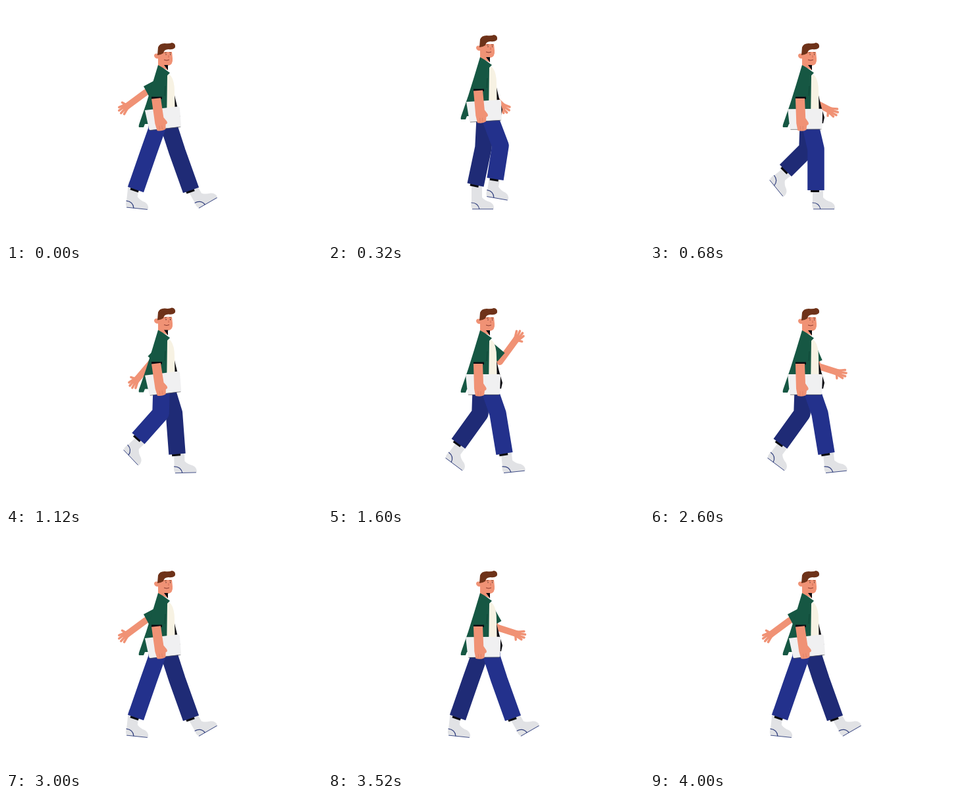
These frames come from a looping animation (480x360 px, 4040 ms). An HTML page with a canvas:

```html
<!DOCTYPE html>
<html>
<head>
<meta charset="utf-8">
<title>Walking and waving</title>
<style>
  html, body { margin: 0; width: 100%; height: 100%; overflow: hidden; background: #fff; }
  canvas { display: block; width: 480px; height: 360px; }
</style>
</head>
<body>
<canvas id="stage" width="480" height="360"></canvas>
<script>
const ctx = document.getElementById('stage').getContext('2d');
const SKIN = '#f09275', HAIR = '#6e3219', GREEN = '#165743', BLACK = '#0b0b10',
      CREAM = '#f7f2e3', LAPTOP = '#f0f0f1', BOOT = '#e1e2e5', SOLE = '#34427f',
      NEAR = '#23318c', FAR = '#1f2b76';
const TAU = Math.PI * 2;

// Every two steps of a 24 step stride, starting with the heel strike:
// hip x, knee x y, cuff x y, sole x y, foot angle
const LEG = [
  [249, 260, 222, 281, 281, 299, 305, -30],
  [248, 258, 219, 268, 280, 274, 309, -6],
  [245, 252, 218, 252, 281, 255, 310, 0],
  [242, 244, 218, 239, 277, 240, 310, 0],
  [238, 236, 216, 224, 273, 226, 310, 0],
  [233, 225, 218, 210, 275, 208, 310, 0],
  [229, 217, 222, 197, 280, 190, 308, 6],
  [232, 231, 219, 198, 265, 184, 291, 37],
  [240, 239, 218, 206, 251, 186, 271, 51],
  [245, 253, 215, 224, 252, 208, 276, 40],
  [248, 262, 213, 254, 264, 248, 292, 10],
  [249, 263, 215, 279, 272, 289, 300, -20]
];

// Every four steps: sleeve end, elbow, hand
const SWING = [
  [213, 130, 212, 132, 181, 155],
  [226, 138, 224, 144, 206, 172],
  [246, 141, 248, 148, 266, 166],
  [256, 137, 255, 142, 289, 153],
  [248, 141, 252, 148, 275, 160],
  [228, 139, 226, 145, 208, 171]
];

const BOB = [[0], [2], [0], [-7], [-12], [-8]];

// Smooth closed curve through evenly spaced keys
function curve(keys, u) {
  const n = keys.length, i = Math.floor(u), f = u - i;
  const [a, b, c, d] = [-1, 0, 1, 2].map(o => keys[(i + o + n) % n]);
  return b.map((v, j) => v + f / 2 * (c[j] - a[j]
    + f * (2 * a[j] - 5 * v + 4 * c[j] - d[j]
    + f * (3 * (v - c[j]) + d[j] - a[j]))));
}

function ramp(t, from, to) {
  const u = Math.min(1, Math.max(0, (t - from) / (to - from)));
  return u * u * (3 - 2 * u);
}

function fill(path, color) {
  ctx.fillStyle = color;
  ctx.fill(new Path2D(path));
}

function stroke(path, color, width, cap = 'butt') {
  ctx.strokeStyle = color;
  ctx.lineWidth = width;
  ctx.lineCap = cap;
  ctx.lineJoin = 'round';
  ctx.stroke(new Path2D(path));
}

function at(x, y, angle, draw) {
  ctx.save();
  ctx.translate(x, y);
  ctx.rotate(angle);
  draw();
  ctx.restore();
}

function foot() {
  fill('M-8 -40H8V-18Q12 -13 20 -11Q26 -8 26 -2L25 0H-6Q-10 -3 -8 -11Z', BOOT);
  stroke('M-8.5 -10Q2 -10 4 0', SOLE, 1.2);
  stroke('M-7 -.2H25', SOLE, .9);
}

function leg(step, bob, color) {
  const [hip, kx, ky, cx, cy, fx, fy, a] = curve(LEG, step % 24 / 2);
  at(fx, fy, a * TAU / 360, foot);
  at(cx, cy, Math.atan2(cy - ky, cx - kx), () => fill('M-2 -5H3V8H-2Z', BLACK));
  stroke(`M${hip} ${180 + bob}V${188 + bob}L${kx} ${ky}L${cx} ${cy}`, color, 25.5);
}

function hand() {
  fill('M-8 -4L2 -6Q6 0 2 6L-8 4Z', SKIN);
  for (const [y, tx, ty] of [[-4, 7, -7], [-1, 10, -3], [2, 10, 2], [4, 7, 6]])
    stroke(`M0 ${y}L${tx} ${ty}`, SKIN, 3.6, 'round');
  stroke('M-4 2L-1 9', SKIN, 3.4, 'round');
}

function farArm(t, step) {
  const wag = Math.cos((t - 1600) / 373 * TAU);
  const wave = [263, 131, 261, 138, 291.5 - 3.5 * wag, 103.5 - 2.5 * wag];
  const w = ramp(t, 1280, 1580) * (1 - ramp(t, 2300, 2600));
  const [sx, sy, ex, ey, hx, hy] =
    curve(SWING, step / 4).map((v, i) => v + (wave[i] - v) * w);
  stroke(`M243 114L${ex} ${ey}L${hx} ${hy}`, SKIN, 10);
  at(hx, hy, Math.atan2(hy - ey, hx - ex), hand);
  stroke(`M243 114L${sx} ${sy}`, GREEN, 17);
}

function head() {
  fill('M231 70H252L253 80Q254 90 246 91V98L231 91Z', SKIN);
  fill('M232 73Q225 71 225 76Q226 81 232 80Z', SKIN);
  fill('M230 75L231 63Q233 57 241 57Q248 58 252 56Q258 57 257 63Q254 67 247 66Q240 66 239 72L235 74Z', HAIR);
  fill('M240 90H246V98Z', BLACK);
  stroke('M241 71.5L244 71M248 71L251 71.5', HAIR, .8);
  stroke('M242.5 74H243.6M249 74H250.1', BLACK, 1.2);
  stroke('M246.5 75L247.5 78H246', '#c9654e', .7);
  stroke('M240 82Q244 84 248 82', '#7c2f26', .9);
}

function torso() {
  fill('M254 128L260 153L265 170L263 179H254Z', BLACK);
  fill('M243 103L250 106Q256 114 256 130L257 178H242Z', CREAM);
  fill('M231 90L238 94L249 102L245 106L244 180H211L209 185H202Q201 183 203 178L213 149L222 120Z', GREEN);
  stroke('M242 122L241 137', '#0f4535', .9);
  fill('M221 138.5H237V142H221Z', BLACK);
}

function carry(step) {
  const tilt = -3.5 * (1 + Math.cos((step - 2) / 24 * TAU));
  at(228, 141, tilt * TAU / 360, () => {
    fill('M-19 16H32Q34 16 34 19L33 46Q33 47 31 47H-14Q-16 47 -16 45Z', LAPTOP);
    stroke('M-15 47.3H32', '#55565a', .7);
    fill('M-7 0H7L8 30L12 36Q14 40 10 41L9 48Q4 51 -4 49L-6 38Z', SKIN);
    stroke('M0 42V48M4 42V48', '#d87a60', .6);
  });
}

function draw(frame) {
  const i = frame % 25, step = i > 12 ? i - 1 : i;   // 24 poses spread over 25 ticks
  const bob = curve(BOB, step % 12 / 2)[0];
  const withBody = (...parts) => {
    ctx.save();
    ctx.translate(0, bob);
    parts.forEach(part => part());
    ctx.restore();
  };
  ctx.fillStyle = '#fff';
  ctx.fillRect(0, 0, 480, 360);
  withBody(() => farArm(frame * 40, step));
  leg(step, bob, FAR);
  leg(step + 12, bob, NEAR);
  withBody(head, torso, () => carry(step));
}

function tick() {
  draw(Math.floor(performance.now() / 40) % 101);
  requestAnimationFrame(tick);
}
tick();
</script>
</body>
</html>
```
